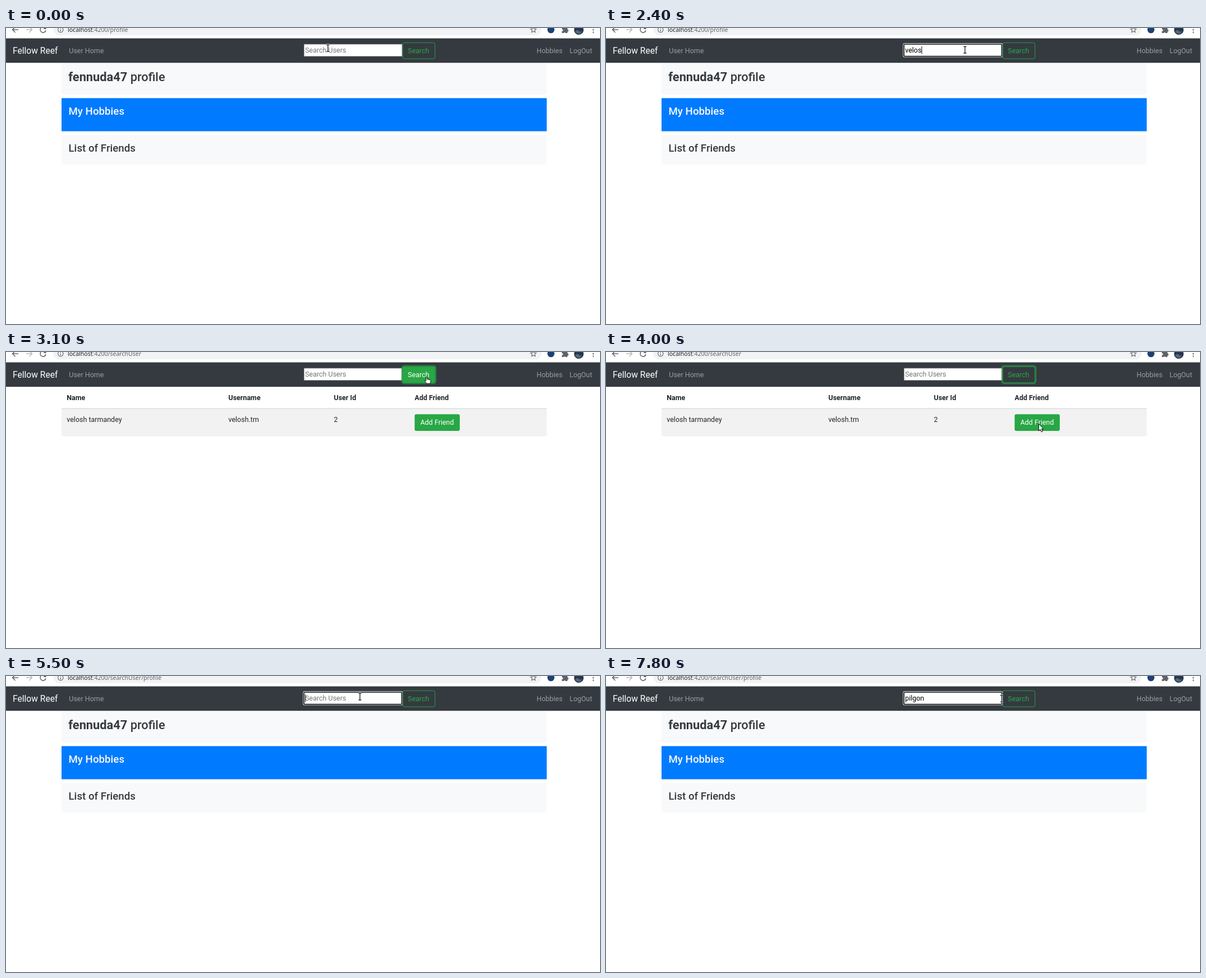
These frames come from a looping animation (1059x529 px, 8000 ms). An HTML page:

```html
<!DOCTYPE html>
<html lang="en">
<head>
<meta charset="utf-8">
<title>User search</title>
<style>
  html, body { margin: 0; width: 100%; height: 100%; overflow: hidden; background: #fff; }
  svg { display: block; width: 1059px; height: 529px; font: 12.47px Roboto, sans-serif; }
  .url { font: 10.55px "Noto Sans", sans-serif; fill: #5f6368; }
  .brand { font-size: 15.6px; fill: #fff; }
  .link { fill: #999c9f; }
  .title { font-size: 21.8px; font-weight: 500; fill: #343a40; }
  .sub { font-size: 18.7px; font-weight: 500; fill: #343a40; }
  .bold { font-weight: 700; }
  .line { fill: none; stroke: #5f6368; stroke-width: 1.5; }
  #table { fill: #212529; }
</style>
</head>
<body>
<svg viewBox="0 0 1059 529">
  <!-- browser toolbar -->
  <rect x="84" y="-9" width="871" height="22" rx="11" fill="#f1f3f4"/>
  <path class="line" d="M22 3H12M16.500-2L11.500 3l5 5"/>
  <path class="line" d="M36 3h10M41.500-2l5 5l-5 5" style="stroke:#babcbe"/>
  <path class="line" d="M70 0A5 5 0 1 0 71 4"/>
  <path d="M71.500-3v5h-5z" fill="#5f6368"/>
  <circle class="line" cx="97.300" cy="3" r="4.700" style="stroke-width:1.100"/>
  <path class="line" d="M97.300 2.500v3.500M97.300 0v1.300" style="stroke-width:1.200"/>
  <text class="url" x="110" y="7"><tspan fill="#202124">localhost</tspan><tspan id="path"></tspan></text>
  <path class="line" d="M940.300-2l1.500 3.300l3.500.4l-2.600 2.400l.7 3.500l-3.100-1.800l-3.100 1.800l.7-3.500l-2.600-2.400l3.500-.4z" style="stroke-width:1.100"/>
  <circle cx="971.500" cy="3" r="6.300" fill="#1d3f72"/>
  <path d="M991-1h3a2 2 0 0 1 4 0h3v3.500a2 2 0 0 1 0 4V9h-3.500a2 2 0 0 0-3.500 0H991V6a2 2 0 0 0 0-4z" fill="#5f6368"/>
  <circle cx="1021.300" cy="3.500" r="8.500" fill="#26364b"/>
  <path d="M1014.500 6q4-4 7-1t6 0q-2 5-6 5.500t-7-4.500z" fill="#52667f"/>
  <g fill="#5f6368"><circle cx="1047" cy="-1" r="1.200"/><circle cx="1047" cy="3.300" r="1.200"/><circle cx="1047" cy="7.600" r="1.200"/></g>

  <g id="profile">
    <rect x="99" y="62" width="865" height="57" fill="#f8f9fa"/>
    <text class="title" x="111.300" y="95"><tspan class="bold">fennuda47</tspan> profile</text>
    <rect x="99" y="125.300" width="865" height="59.200" fill="#007bff"/>
    <text class="sub" x="111.500" y="155" style="fill:#f8f9fa">My Hobbies</text>
    <rect x="99" y="190.700" width="865" height="53.200" fill="#f8f9fa"/>
    <text class="sub" x="111.500" y="220.500">List of Friends</text>
  </g>

  <g id="table">
    <g class="bold">
      <text x="108.300" y="85.700">Name</text><text x="396.500" y="85.700">Username</text>
      <text x="584.500" y="85.700">User Id</text><text x="728.500" y="85.700">Add Friend</text>
    </g>
    <rect x="99" y="100.200" width="865" height="50.400" fill="#f2f2f2"/>
    <rect x="99" y="100.200" width="865" height="1.600" fill="#dee2e6"/>
    <text x="108.300" y="124.700">velosh tarmandey</text><text x="396.500" y="124.700">velosh.tm</text>
    <text x="584.500" y="124.700">2</text>
    <rect x="728.500" y="111.200" width="80.500" height="29.700" rx="3" fill="#28a745"/>
    <text x="738.700" y="130.200" fill="#fff">Add Friend</text>
  </g>

  <!-- navigation bar -->
  <rect y="18.500" width="1059" height="43.700" fill="#343a40"/>
  <text class="brand" x="12" y="45.800">Fellow Reef</text>
  <text class="link" x="112.300" y="44.700">User Home</text>
  <text class="link" x="946" y="44.700">Hobbies</text>
  <text class="link" x="1004.700" y="44.700">LogOut</text>
  <rect x="531.300" y="29" width="174.800" height="21.700" fill="#fff" stroke="#858585" stroke-width=".8"/>
  <g id="focus">
    <rect x="529.500" y="27.300" width="177.800" height="25" rx="2.500" fill="#fff"/>
    <rect x="531.200" y="29" width="174.400" height="21.600" rx="1" fill="#fff" stroke="#101010" stroke-width="1.700"/>
  </g>
  <text id="query" x="533.200" y="44.200"></text>
  <rect id="caret" y="33" width="1" height="13.500"/>
  <rect id="ring" x="706" y="25" width="60" height="31" rx="4" fill="none" stroke="#28a745" stroke-opacity=".55" stroke-width="3"/>
  <rect id="button" x="707.200" y="26.200" width="57.600" height="28.800" rx="3" stroke="#28a745" stroke-width=".9"/>
  <text id="label" x="716.300" y="44.700">Search</text>

  <!-- pointers, each with its hot spot at the origin -->
  <g id="pointer" stroke-linejoin="round">
    <g id="beam" fill="none">
      <path d="M-2.500-6H2.500M0-6V6M-2.500 6H2.500" stroke="#fff" stroke-width="3"/>
      <path d="M-2.500-6H-1L0-5L1-6H2.500M0-5V5M-2.500 6H-1L0 5L1 6H2.500" stroke="#222" stroke-width="1.400"/>
    </g>
    <path id="arrow" d="M.5.5V13L3.300 10.300L5.300 15L7.500 14L5.500 9.500H9z" fill="#fff" stroke="#111"/>
    <path id="hand" d="M-2.200-5q1.100-1.500 2 0V-1.500l5 1q1.500.4 1.400 2L5.500 6.500H-.5L-4.500 2q-.4-1.700 1.200-1.200l1.100.9z" fill="#fff" stroke="#111"/>
  </g>
</svg>
<script>
const LOOP = 8000;
const $ = id => document.getElementById(id);
const show = (id, on) => $(id).setAttribute("display", on ? "inline" : "none");

// Each track lists [start in ms, value...]; values hold until the next entry.
const paths = [[0, ":4200/profile"], [3100, ":4200/searchUser"], [4300, ":4200/searchUser/profile"]];
const typing = [
  [0, ""], [900, "v"], [1200, "ve"], [1300, "vel"], [1500, "velo"], [2100, "velos"], [3100, ""],
  [6100, "p"], [6400, "pi"], [6800, "pilg"], [7100, "pilgo"], [7300, "pilgon"]
];
const pointers = [
  [0, "beam", 574, 36], [2400, "beam", 640, 39], [2500, "beam", 694, 43], [3000, "hand", 751, 50],
  [3300, "arrow", 763, 53], [3500, "arrow", 794, 83], [3700, "arrow", 800, 115],
  [3900, "arrow", 785, 124], [4000, "arrow", 771, 128], [4600, "arrow", 659, 53],
  [4800, "beam", 645, 44], [4900, "beam", 637, 37], [5100, "beam", 631, 37], [7800, "beam", 705.5, 40.5]
];
const at = (track, t) => track.findLast(entry => entry[0] <= t).slice(1);
const within = (t, from, to) => t >= from && t < to;

function render(t) {
  const searching = within(t, 3100, 4300);
  const focused = within(t, 300, 3000) || t >= 5500;
  const hovered = within(t, 3000, 3500);
  const [text] = at(typing, t);
  const [kind, x, y] = at(pointers, t);

  $("path").textContent = at(paths, t)[0];
  show("profile", !searching);
  show("table", searching);

  show("focus", focused);
  $("query").textContent = text || "Search Users";
  $("query").setAttribute("fill", text ? "#000" : "#757575");
  show("caret", focused && t < 7800);
  $("caret").setAttribute("x", 533.3 + (text ? $("query").getComputedTextLength() : 0));

  show("ring", searching);
  $("button").setAttribute("fill", hovered ? "#28a745" : "#343a40");
  $("label").setAttribute("fill", hovered ? "#fff" : "#28a745");

  for (const id of ["beam", "arrow", "hand"]) show(id, id === kind);
  $("pointer").setAttribute("transform", `translate(${x} ${y})`);
}

function tick() {
  render(performance.now() % LOOP);
  requestAnimationFrame(tick);
}
tick();
</script>
</body>
</html>
```
